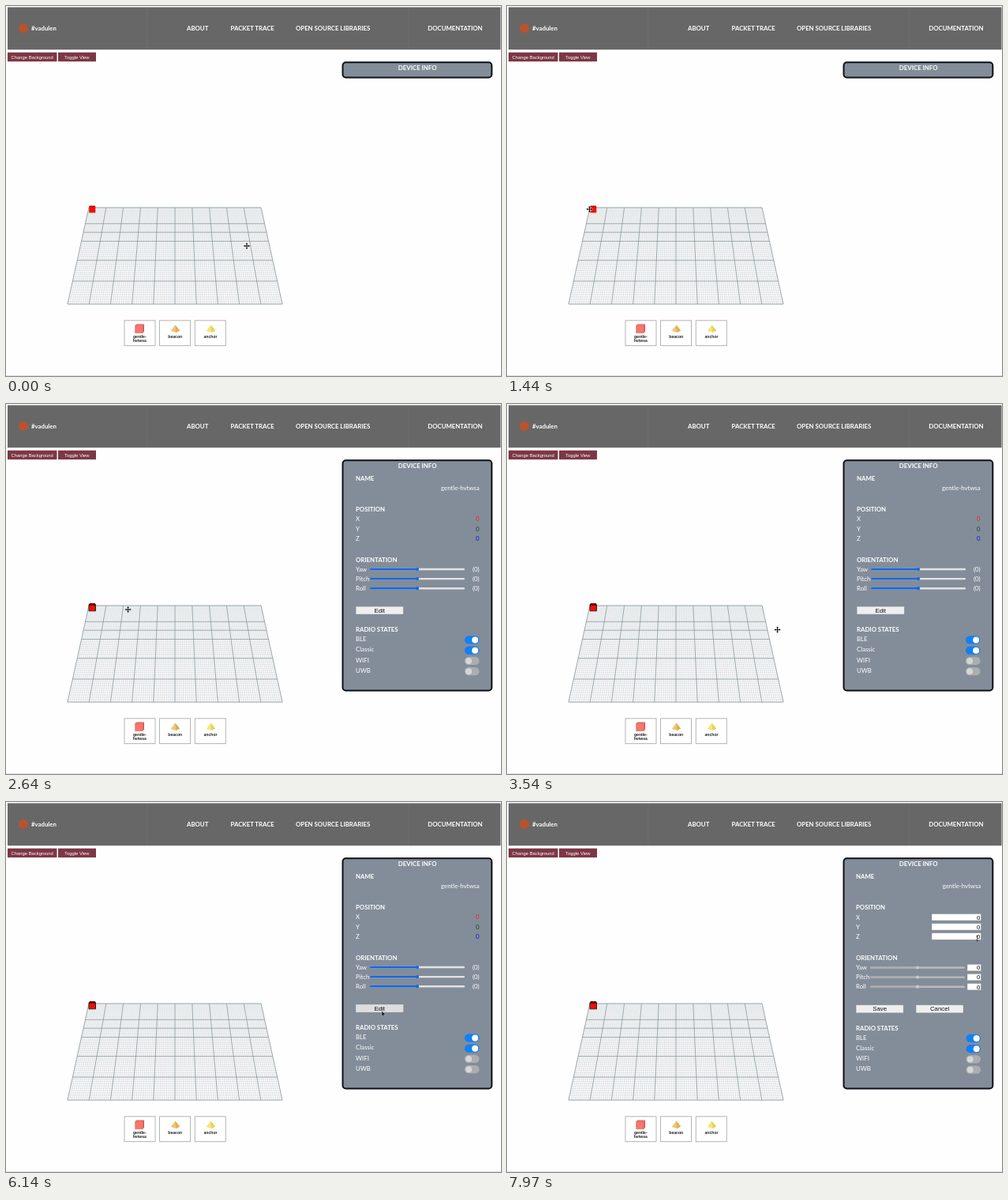
An HTML page for the animation above (8000 ms loop, 627 px wide and 468 px high).

```html
<!DOCTYPE html>
<html lang="en">
<head>
<meta charset="utf-8">
<title>Device simulator</title>
<style>
  html, body { margin: 0; width: 100%; height: 100%; overflow: hidden; background: #fefefe; }
  svg { display: block; width: 627px; height: 468px; }
  text { font: 7.8px Lato, sans-serif; fill: #fff; white-space: pre; }
  .bold { font-weight: 700; }
  .ui { font: 7.8px "Liberation Sans", Arial, sans-serif; fill: #111; }
  .small { font-size: 5.85px; fill: #fff; }
  .tag { font-size: 5.1px; font-weight: 700; fill: #222; }
</style>
</head>
<body>
<svg id="stage" viewBox="0 0 627 468"></svg>
<script>
const DURATION = 8000;
const OPEN_AT = 2000;
const EDIT_AT = 6350;
const DEVICE = ["gentle-", "hvtwsa"];

const rect = (x, y, w, h, fill, more = "") =>
  `<rect x="${x}" y="${y}" width="${w}" height="${h}" fill="${fill}" ${more}/>`;
const path = (d, fill, more = "") => `<path d="${d}" fill="${fill}" ${more}/>`;
const circle = (x, y, r, fill) => `<circle cx="${x}" cy="${y}" r="${r}" fill="${fill}"/>`;
const text = (x, y, s, cls = "", anchor = "start", fill = "") =>
  `<text x="${x}" y="${y}" class="${cls}" text-anchor="${anchor}"${fill && ` style="fill:${fill}"`}>${s}</text>`;
const group = (id, content) => `<g id="${id}" visibility="hidden">${content}</g>`;

function header() {
  const links = [[229, "ABOUT"], [284.5, "PACKET TRACE"], [367, "OPEN SOURCE LIBRARIES"], [534.3, "DOCUMENTATION"]];
  return rect(2, 1.5, 624.5, 53.7, "#676767") +
    rect(178.5, 2, .7, 53, "#727272") + rect(509.5, 2, .7, 53, "#727272") +
    circle(22, 28, 6, "#b9532f") +
    text(32, 30.7, "#vadulen", "bold") +
    links.map(([x, s]) => text(x, 30.7, s, "bold")).join("") +
    rect(2, 58.7, 62.5, 11.5, "#7d3645") + rect(66, 58.7, 48, 11.5, "#7d3645") +
    text(33.2, 66.7, "Change Background", "ui small", "middle") +
    text(89.8, 66.7, "Toggle View", "ui small", "middle") +
    rect(0, 467, 627, 1, "#dfe0e0");
}

// Floor plane in perspective: depth is linear in 1 / row width.
function grid() {
  const top = 255, bottom = 377, far = 218, near = 272, mid = 214;
  const width = v => 1 / (1 / near + v / 5 * (1 / far - 1 / near));
  const rowY = v => top + (bottom - top) * (width(v) - far) / (near - far);
  const column = u => `M${mid + (u / 10 - .5) * far} ${top}L${mid + (u / 10 - .5) * near} ${bottom}`;
  const row = v => `M${mid - width(v) / 2} ${rowY(v)}h${width(v)}`;
  const range = (n, step) => Array.from({ length: n + 1 }, (_, i) => i * step);
  const lines = (d, color, w) => path(d, "none", `stroke="${color}" stroke-width="${w}"`);
  return lines(range(100, .1).map(column).join("") + range(50, .1).map(row).join(""), "#b9c3c5", .38) +
    lines(range(10, 1).map(column).join("") + range(5, 1).map(row).join("") + row(3.5), "#71878c", .65);
}

const cube = () =>
  path("M105.2 254.3L106 252.8H112.6L113.3 254.3V261.6H105.2Z", "#f01008") +
  path("M105.2 254.3L106 252.8H112.6L113.3 254.3Z", "#b80b08");
const outline = () =>
  path("M105 254.2L106 252.5H112.7L113.5 254.2V261.8H105ZM105 254.2H113.5M107 252.5V254.2M111.5 252.5V254.2",
    "none", 'stroke="#2a0505" stroke-width=".9"');

function palette() {
  const box = x => rect(x, 397.8, 39, 31.8, "#fff", 'stroke="#b4b4b4"');
  const pyramid = (x, light, dark) =>
    path(`M${x} 403.6L${x + 5.7} 410.6L${x + 1} 413L${x - 5.7} 411Z`, light) +
    path(`M${x} 403.6L${x + 5.7} 410.6L${x + 1} 413Z`, dark);
  return box(150) + box(194.5) + box(239.3) +
    path("M163.7 404L165.4 402.3H175L173.4 404V413.6H163.7Z", "#f5776d") +
    path("M173.4 404L175 402.3V411.8L173.4 413.6Z", "#d94f48") +
    path("M163.7 404H173.4V413.6H163.7Z", "none", 'stroke="#df5b53" stroke-width=".6"') +
    pyramid(214.4, "#efc574", "#e1ad57") + pyramid(259.4, "#f5e57a", "#e8d15b") +
    DEVICE.map((s, i) => text(169.3, 419.8 + i * 5.6, s, "ui tag", "middle")).join("") +
    text(214.2, 419.8, "beacon", "ui tag", "middle") + text(259, 419.8, "anchor", "ui tag", "middle");
}

const panel = height =>
  rect(426.5, 71.2, 188.8, height, "#838d99", 'rx="4" stroke="#0d1015" stroke-width="2"');

const button = (x, y, label, fill = "#efefef") =>
  rect(x, y, 59.5, 9.4, fill, 'stroke="#d2d2d2" stroke-width=".4"') +
  text(x + 29.8, y + 7.4, label, "ui", "middle");

function slider(x, y, active) {
  return rect(x, y - 1.2, 120, 2.4, active ? "#e3e3e3" : "#b9babc", 'rx="1.2"') +
    rect(x, y - 1.2, 60, 2.4, active ? "#1268e6" : "#acadaf", 'rx="1.2"') +
    circle(x + 60, y, 2.1, active ? "#1268e6" : "#c6c7c9");
}

function toggle(x, y, on) {
  return rect(x, y - 5.2, 18.6, 10.4, on ? "#1180f5" : "#abadaf", 'rx="5.2"') +
    circle(x + (on ? 13.2 : 5.2), y, 4, on ? "#fff" : "#d5d6d7");
}

const input = (x, y, w) =>
  rect(x, y - 4.2, w, 8.4, "#fff", 'stroke="#888" stroke-width=".4"') +
  text(599.4, y + 2.8, "0", "ui", "end");

function details(editing) {
  const left = editing ? 442 : 443;
  const right = editing ? 600.2 : 599.6;
  const drop = editing ? .5 : 0;
  const title = (y, s) => text(left, y, s, "bold");
  let out = title(96.8, "NAME") + text(right, 108.7, DEVICE.join(""), "", "end") +
    title(135.8 + drop / 2, "POSITION") + title(199.5 + drop, "ORIENTATION") + title(288 + drop, "RADIO STATES");

  [["X", "#e9292b"], ["Y", "#0b4a20"], ["Z", "#0c18e8"]].forEach(([s, color], i) => {
    const y = 145.5 + i * 12.1 + drop / 2;
    out += text(left, y + 2.9, s) +
      (editing ? input(538, y, 62.4) : text(right, y + 2.9, "0", "", "end", color));
  });
  ["Yaw", "Pitch", "Roll"].forEach((s, i) => {
    const y = 209 + i * 12.1 + drop;
    out += text(left, y + 2.6, s) + slider(left + 18, y, !editing) +
      (editing ? input(583, y, 17.4) : text(right, y + 2.7, "(0)", "", "end"));
  });
  ["BLE", "Classic", "WIFI", "UWB"].forEach((s, i) => {
    const y = 298.4 + i * 13.25 + drop;
    out += text(left, y + 1.8, s) + toggle(right - 18.7, y, i < 2);
  });
  return out + (editing
    ? button(442.4, 257, "Save") + button(518.3, 257, "Cancel")
    : button(443.5, 256.4, "Edit"));
}

const arrowHead = "M0 -4L1.6 -2.2H.5V-.5H2.2V-1.6L4 0L2.2 1.6V.5H.5V2.2H1.6L0 4L-1.6 2.2H-.5V.5H-2.2V1.6L-4 0L-2.2 -1.6V-.5H-.5V-2.2H-1.6Z";
const halo = 'stroke="#fff" stroke-width=".9" paint-order="stroke"';
const pointers = {
  move: path(arrowHead, "#111", halo),
  arrow: path("M0 -4V3L1.5 1.7L2.5 4L3.5 3.5L2.5 1.3H4.5Z", "#111", 'stroke="#eee" stroke-width=".4"'),
  hand: path("M-1 -3H0V-1L2.5 -.4L2.8 1L2 3.2H-1L-2.5 .8L-1 .5Z", "#111"),
  beam: path("M-1.3 -3H1.3M0 -3V3M-1.3 3H1.3", "none", 'stroke="#222" stroke-width=".7"')
};

const stage = document.getElementById("stage");
stage.innerHTML = rect(0, 0, 627, 468, "#fefefe") + header() + grid() + cube() + palette() +
  group("closed", panel(19.3)) +
  group("opened", panel(291.2) + outline()) +
  group("viewing", details(false)) +
  group("hover", button(443.5, 256.4, "Edit", "#dedede")) +
  group("editing", details(true)) +
  text(521.2, 81.4, "DEVICE INFO", "bold", "middle") +
  `<g id="pointer">${Object.entries(pointers).map(([id, shape]) => group(id, shape)).join("")}</g>`;

// time, x, y, pointer shape from this time on
const track = [
  [0, 305, 303.5, "move"],
  [300, 305, 303.5, "move"],
  [1200, 105, 257, "move"],
  [1450, 104.5, 257, "move"],
  [1750, 109, 257, "move"],
  [2150, 109, 257, "move"],
  [2640, 154.5, 260, "move"],
  [3540, 342.5, 285.5, "move"],
  [3950, 420, 284, "arrow"],
  [4500, 473, 270, "arrow"],
  [4800, 473.3, 269.7, "hand"],
  [5200, 473.3, 269.7, "hand"],
  [5700, 476, 268, "arrow"],
  [6450, 476, 268, "arrow"],
  [7200, 578, 188, "arrow"],
  [7600, 595.5, 172.5, "beam"],
  [8000, 595.5, 172.5, "beam"]
];

const byId = id => document.getElementById(id);
const show = (id, on) => byId(id).setAttribute("visibility", on ? "visible" : "hidden");

function draw(t) {
  const i = Math.max(0, track.findIndex(step => step[0] > t) - 1);
  const [t0, x0, y0, shape] = track[i];
  const [t1, x1, y1] = track[i + 1];
  const p = (t - t0) / (t1 - t0);
  const k = p * p * (3 - 2 * p) * .5 + p * .5;
  const x = x0 + (x1 - x0) * k, y = y0 + (y1 - y0) * k;
  byId("pointer").setAttribute("transform", `translate(${x} ${y})`);
  for (const id in pointers) show(id, id === shape);

  const opened = t >= OPEN_AT, editing = t >= EDIT_AT;
  show("closed", !opened);
  show("opened", opened);
  show("viewing", opened && !editing);
  show("hover", t >= 5500 && !editing);
  show("editing", editing);
}

const start = performance.now();
function tick() {
  draw((performance.now() - start) % DURATION);
  requestAnimationFrame(tick);
}
tick();
</script>
</body>
</html>
```
